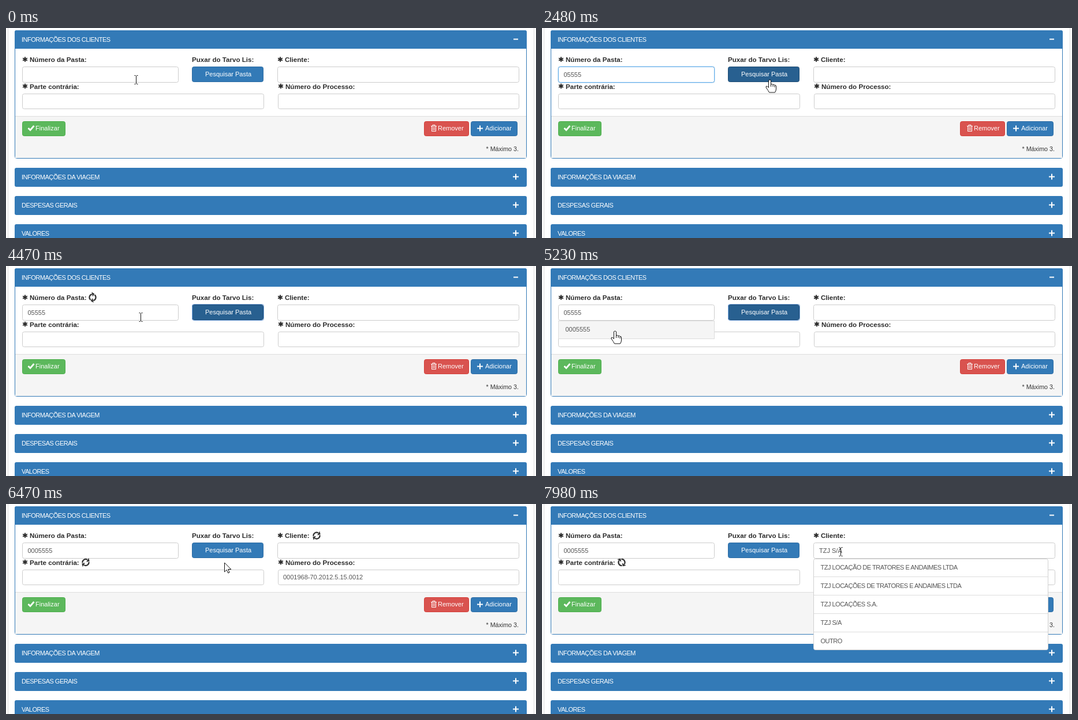
An HTML page that plays this animation: 918x365 px, repeating every 8000 ms.

```html
<!DOCTYPE html>
<html lang="pt-BR">
<head>
<meta charset="utf-8">
<title>Informações dos clientes</title>
<style>
  html, body { margin: 0; width: 100%; height: 100%; overflow: hidden; background: #fff; }
  svg { display: block; width: 918px; height: 365px; }
  text { font: 11px "Liberation Sans", Arial, sans-serif; fill: #555; white-space: pre; }
  .caps { letter-spacing: -.5px; }
  .light { fill: #fff; }
  .label { font-size: 11.6px; font-weight: bold; fill: #2b2b2b; }
  .note { font-size: 10.7px; fill: #333; }
</style>
</head>
<body>
<svg viewBox="0 0 918 365"><g id="page"></g><g id="live"></g></svg>
<script>
const LOOP = 8000;
const BLUE = '#337ab7';

const text = (x, y, str, cls = '') => `<text x="${x}" y="${y}" class="${cls}">${str}</text>`;
const rect = (x, y, w, h, fill, stroke = 'none', r = 0) =>
  `<rect x="${x}" y="${y}" width="${w}" height="${h}" rx="${r}" fill="${fill}" stroke="${stroke}"/>`;
const path = (d, stroke, width = 1, fill = 'none', move = '') =>
  `<path d="${d}" stroke="${stroke}" stroke-width="${width}" fill="${fill}" transform="${move}"/>`;
const box = (a, fill, stroke, r = 3) => rect(a.x + .5, a.y + .5, a.w - 1, a.h - 1, fill, stroke, r);
const area = (x, y, w, h) => ({ x, y, w, h });
const inside = (p, a) => p.x >= a.x && p.x < a.x + a.w && p.y >= a.y && p.y < a.y + a.h;
const during = (t, from, to) => t >= from && t < to;
const ramp = (t, from, to) => Math.min(1, Math.max(0, (t - from) / (to - from)));

const folder = area(28, 67, 271, 28);
const client = area(470, 67, 419, 28);
const opponent = area(28, 114, 419, 27);
const lawsuit = area(471, 114, 418, 27);
const inputs = [folder, client, opponent, lawsuit];
const search = area(322, 67, 124, 27);
const folderList = area(28, 95, 271, 32);
const clientList = area(470, 95, 407, 159);

const clients = [
  'TZJ LOCAÇÃO DE TRATORES E ANDAIMES LTDA',
  'TZJ LOCAÇÕES DE TRATORES E ANDAIMES LTDA',
  'TZJ LOCAÇÕES S.A.',
  'TZJ S/A',
  'OUTRO'
];
const history = ['0005555', '0005432', '0004210', '0003127', '0002046', '0001968'];
const keyTimes = [1050, 1230, 1370, 1550, 1800];

// Pointer stops: time, x, y
const track = [
  [0, 225, 90], [50, 225, 90], [120, 225, 80], [2240, 225, 80], [2480, 394, 90],
  [3820, 394, 90], [4100, 330, 93], [4400, 250, 86], [4900, 130, 110], [5100, 126, 113],
  [5600, 126, 113], [5900, 232, 111], [6150, 232, 111], [6640, 455, 97], [6910, 590, 68],
  [7160, 690, 82], [7350, 755, 84], [7800, 517, 83], [LOOP, 517, 83]
];

const cursors = {
  beam: ['M-3 -7.5H-1M1 -7.5H3M0 -7V7M-3 7.5H-1M1 7.5H3', 'none'],
  arrow: ['M0 0V16L3.7 12.4 6.2 18 8.6 17 6.2 11.5H11.3Z', '#fff'],
  hand: ['M-2 1Q0 -1 2 1V8Q4 6.5 5.5 8.5Q7.5 7 8.5 9.5Q10.5 8.5 11 11V16Q11 19 9 22H-1' +
         'Q-2.5 19 -6 14Q-7.5 11.5 -5.5 11Q-4 11 -2 13.5ZM2 8V12M5.5 9V12M8.5 10V13', '#fff']
};

function pointerAt(t) {
  const i = Math.max(1, track.findIndex(stop => stop[0] > t));
  const [t0, x0, y0] = track[i - 1], [t1, x1, y1] = track[i];
  const k = (t - t0) / (t1 - t0);
  return { x: x0 + (x1 - x0) * k, y: y0 + (y1 - y0) * k };
}

function label(x, y, str, required = true) {
  if (!required) return text(x, y, str, 'label');
  const star = path('M0 -4.3V4.3M-3.8 -2.2L3.8 2.2M-3.8 2.2L3.8 -2.2', '#2b2b2b', 2, 'none',
    `translate(${x + 5} ${y - 4.5})`);
  return star + text(x + 13, y, str, 'label');
}

function heading(y, str, open) {
  return rect(15, y, 887, 33, BLUE, 'none', 3) + text(27, y + 19.5, str, 'caps light') +
    path(open ? 'M-4 0H4' : 'M-5 0H5M0 -5V5', '#fff', 2, 'none', `translate(883 ${y + 15.5})`);
}

function button(x, w, fill, stroke, str, textX, icon, iconWidth) {
  return box(area(x, 162, w, 26), fill, stroke) + text(textX, 178, str, 'light') +
    path(icon, '#fff', iconWidth);
}

function spinner(x, y, age) {
  const half = 'M-5.5 -.6A5.5 5.5 0 0 1 4 -3.8';
  const head = 'M7 -6.2V-.4H1.2Z';
  const arrow = turn => path(half, '#333', 2.2, 'none', turn) + path(head, 'none', 0, '#333', turn);
  return `<g transform="translate(${x} ${y}) rotate(${age * .18})">${arrow('')}${arrow('rotate(180)')}</g>`;
}

function searchButton(t, pointer) {
  const focused = during(t, 2660, 5410), pressed = during(t, 2660, 2800);
  const dark = focused || inside(pointer, search);
  const fill = pressed ? '#204d74' : dark ? '#286090' : BLUE;
  const ring = focused ? rect(322.5, 66.5, 124, 28, 'none', '#78a6e0', 3) : '';
  return box(search, fill, dark ? '#204d74' : '#2e6da4') + ring +
    text(345, 84, 'Pesquisar Pasta', 'light');
}

function folderInput(t) {
  const typed = keyTimes.filter(time => time <= t).length;
  const glow = t < 2800 ? ramp(t, 260, 370) : 1 - ramp(t, 2770, 2900);
  const caretOn = during(t, 300, 730) || during(t, 1050, 2300);
  return `<g opacity="${glow}">${rect(27.5, 66.5, 272, 29, 'none', '#c9e3f8', 4)}` +
    `${box(folder, 'none', '#66afe9')}</g>` +
    text(37.5, 85, t < 5410 ? '05555'.slice(0, typed) : '0005555') +
    (caretOn ? rect(38 + 6 * typed, 74, 1, 14, '#333') : '');
}

function historyPopup() {
  return rect(30, 97, 272, 144, '#0002') + box(area(28, 95, 271, 144), '#fff', '#bbb', 0) +
    history.map((item, i) => text(37.5, 112 + i * 23.5, item)).join('');
}

function clientPopup() {
  const rows = clients.map((name, i) =>
    (i ? path(`M471 ${94.5 + i * 32}H876`, '#ddd') : '') + text(482.5, 114 + i * 32, name, 'caps'));
  return text(480, 85, 'TZJ S/A') + box(clientList, '#fff', '#d0d0d0') + rows.join('');
}

const page = [
  path('M3.5 0V365M914.5 0V365', '#ddd'),
  box(area(15, 4, 887, 223), '#fff', BLUE),
  heading(4, 'INFORMAÇÕES DOS CLIENTES', true),
  rect(16, 36, 885, 117, '#fff'),
  rect(16, 153, 885, 73, '#f5f5f5'),
  path('M16 153.5H901', '#ddd'),
  inputs.map(a => box(a, '#fff', '#ccc')).join(''),
  label(28, 59, 'Número da Pasta:'),
  label(322, 59, 'Puxar do Tarvo Lis:', false),
  label(470, 59, 'Cliente:'),
  label(28, 105.5, 'Parte contrária:'),
  label(471, 105.5, 'Número do Processo:'),
  button(28, 75, '#5cb85c', '#4cae4c', 'Finalizar', 51, 'M38.5 174L42 177.5L48.5 170', 2.8),
  button(724, 78, '#d9534f', '#d43f3a', 'Remover', 748,
    'M736 170.5H746M739 170V168.5H743V170M737.5 171V179.5H744.5V171M739.8 172V178M742.2 172V178', 1),
  button(805, 81, BLUE, '#2e6da4', 'Adicionar', 830, 'M816 174.5H826M821 169.5V179.5', 2),
  text(831.5, 214, '* Máximo 3.', 'note'),
  heading(243, 'INFORMAÇÕES DA VIAGEM'),
  heading(292, 'DESPESAS GERAIS'),
  heading(341, 'VALORES')
];
document.getElementById('page').innerHTML = page.join('');
const live = document.getElementById('live');

function draw() {
  const t = performance.now() % LOOP;
  const pointer = pointerAt(t);
  const listOpen = during(t, 4530, 5410);
  const overList = listOpen && inside(pointer, folderList);
  const shape = overList || inside(pointer, search) ? 'hand'
    : inputs.some(a => inside(pointer, a)) ? 'beam' : 'arrow';
  const [outline, fill] = cursors[shape];
  const x = Math.round(pointer.x) + .5, y = Math.round(pointer.y);

  live.innerHTML = [
    searchButton(t, pointer),
    folderInput(t),
    during(t, 1050, 1230) && historyPopup(),
    during(t, 2800, 4530) && spinner(150, 54.5, t - 2800),
    listOpen && box(folderList, overList ? '#f5f5f5' : '#fff', '#ddd', 0) + text(40.5, 114, '0005555'),
    t >= 5550 && spinner(138, 101.5, t - 5550),
    during(t, 5550, 6640) && spinner(538, 55, t - 5550),
    t >= 5760 && text(480, 131, '0001968-70.2012.5.15.0012'),
    t >= 6640 && clientPopup(),
    path(outline, '#111', 1, fill, `translate(${x} ${y})`)
  ].filter(Boolean).join('');
  requestAnimationFrame(draw);
}
draw();
</script>
</body>
</html>
```
